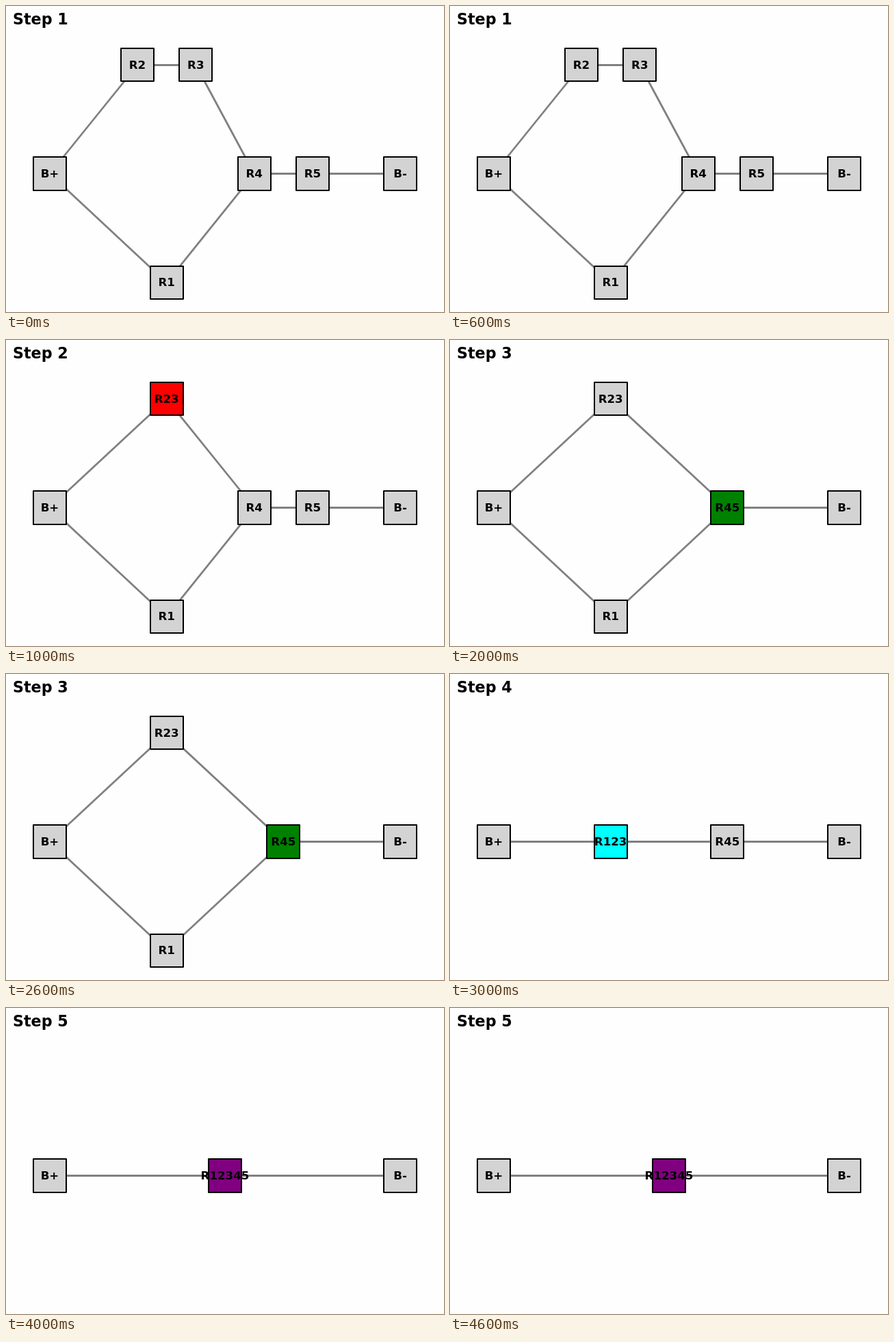
These frames come from a looping animation (640x448 px, 5 s). An HTML page:

```html
<!DOCTYPE html>
<html lang="en">
<head>
<meta charset="utf-8">
<title>Circuit reduction</title>
<style>
  html, body { margin: 0; width: 100%; height: 100%; overflow: hidden; background: #fefefe; }
  svg { display: block; width: 640px; height: 448px; }
  text { font: bold 16.667px "DejaVu Sans", sans-serif; text-anchor: middle; }
  .title { font-size: 22.222px; text-anchor: start; }
  line { stroke: #808080; stroke-width: 2.78; }
  rect { stroke: #000; stroke-width: 2; stroke-linejoin: round; }
  .step { visibility: hidden; animation: show 5s step-end infinite; }
  @keyframes show {
    0% { visibility: visible; }
    20%, 100% { visibility: hidden; }
  }
</style>
</head>
<body>
<svg id="stage" viewBox="0 0 640 448"></svg>
<script>
  const UNIT = 128 / 3;
  const ROWS = {
    top: { y: 86.5, box: 62, height: 48, base: 92 },
    mid: { y: 245.5, box: 221, height: 49, base: 251 },
    low: { y: 405, box: 381, height: 48, base: 410 }
  };

  // label: [column in grid units, row]
  const NODES = {
    "B+": [0, "mid"], "B-": [12, "mid"],
    R1: [4, "low"], R2: [3, "top"], R3: [5, "top"], R4: [7, "mid"], R5: [9, "mid"],
    R23: [4, "top"], R45: [8, "mid"], R123: [4, "mid"], R12345: [6, "mid"]
  };

  // Each step lists its paths, plus the freshly merged node and its colour.
  const STEPS = [
    { paths: ["B+ R2 R3 R4 R5 B-", "B+ R1 R4"] },
    { paths: ["B+ R23 R4 R5 B-", "B+ R1 R4"], merged: "R23", color: "#ff0000" },
    { paths: ["B+ R23 R45 B-", "B+ R1 R45"], merged: "R45", color: "#008000" },
    { paths: ["B+ R123 R45 B-"], merged: "R123", color: "#00ffff" },
    { paths: ["B+ R12345 B-"], merged: "R12345", color: "#800080" }
  ];

  const place = name => {
    const [column, row] = NODES[name];
    return { x: 64 + column * UNIT, ...ROWS[row] };
  };

  function edge(from, to) {
    const a = place(from), b = place(to);
    return `<line x1="${a.x}" y1="${a.y}" x2="${b.x}" y2="${b.y}"/>`;
  }

  function node(name, fill) {
    const { x, box, height, base } = place(name);
    const cx = Math.round(x);
    return `<rect x="${cx - 24}" y="${box}" width="48" height="${height}" fill="${fill}"/>` +
      `<text x="${x}" y="${base}">${name}</text>`;
  }

  function step({ paths, merged, color }, i) {
    const chains = paths.map(path => path.split(" "));
    const edges = chains.flatMap(chain => chain.slice(1).map((name, k) => edge(chain[k], name)));
    const names = [...new Set(chains.flat())];
    const nodes = names.map(name => node(name, name === merged ? color : "#d3d3d3"));
    return `<g class="step" style="animation-delay:${i ? i - 5 : 0}s">` +
      `<text class="title" x="10" y="27">Step ${i + 1}</text>` +
      edges.join("") + nodes.join("") + "</g>";
  }

  document.getElementById("stage").innerHTML = STEPS.map(step).join("");
</script>
</body>
</html>
```
